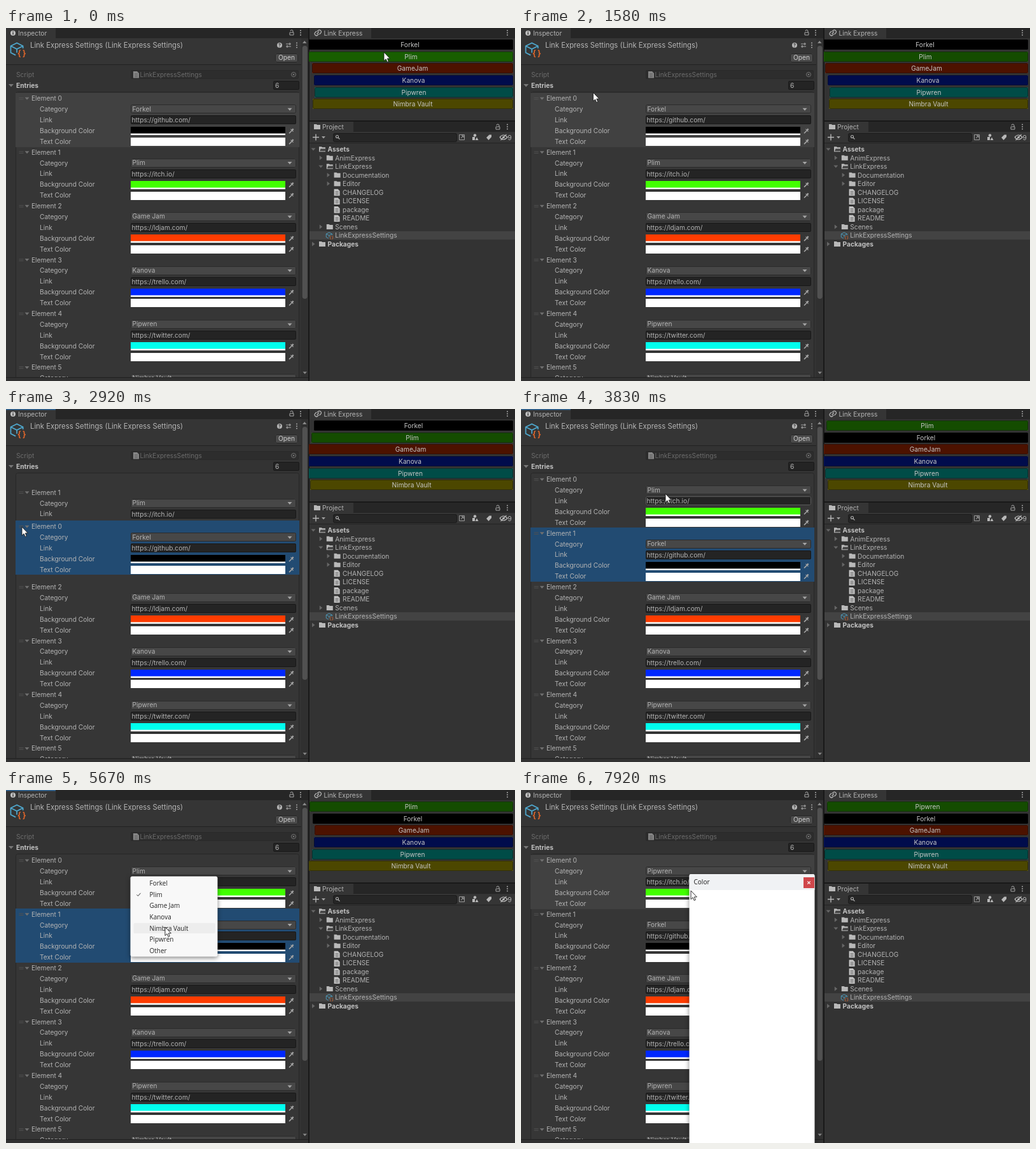
These frames come from a looping animation (800x554 px, 8 s). An HTML page with a canvas:

```html
<!DOCTYPE html>
<html lang="en">
<head>
<meta charset="utf-8">
<title>Link Express</title>
<style>
html, body { margin: 0; width: 100%; height: 100%; overflow: hidden; background: #333; }
canvas { display: block; width: 800px; height: 554px; }
</style>
</head>
<body>
<canvas id="stage" width="800" height="554"></canvas>
<script>
const ctx = document.getElementById('stage').getContext('2d');
const LOOP = 8000, STEP = LOOP / 96;
const ROW = 16.9, PITCH = 84.45, TOP = 110.5;
const UI = 'Inter, sans-serif', MENU = '"Open Sans", sans-serif';
const TEXT = '#b4b4b4', DIM = '#6c6c6c', SELECTED = '#224b72';

// Moments at which the state changes, in ms.
const AT = { grab: 2400, drop: 3415, open: 4245, pick: 6415, picker: 7745 };

const entries = [
  { name: 'Forkel', link: 'https://github.com/', color: '#000000' },
  { name: 'Plim', link: 'https://itch.io/', color: '#42ff00' },
  { name: 'Game Jam', link: 'https://ldjam.com/', color: '#ff3c00' },
  { name: 'Kanova', link: 'https://trello.com/', color: '#0028ff' },
  { name: 'Pipwren', link: 'https://twitter.com/', color: '#00ffee' },
  { name: 'Nimbra Vault', link: '', color: '#ffee00' }
];
const choices = ['Forkel', 'Plim', 'Game Jam', 'Kanova', 'Nimbra Vault', 'Pipwren', 'Other'];

// Pointer path: time, x, y.
const path = [
  [0, 594, 38], [920, 595, 123], [1170, 592, 116], [1670, 72, 100], [2080, 23, 111],
  [2400, 23, 111], [2500, 24, 137], [2920, 25, 185], [3250, 25, 195], [3420, 25, 194],
  [3830, 227, 133], [4010, 231, 128], [4250, 231, 128], [4950, 248, 186], [5600, 250, 215],
  [5900, 250, 215], [6170, 249, 234], [6420, 249, 234], [7170, 267, 160], [7800, 267, 158]
];

function pointerAt(t) {
  const next = path.findIndex(p => p[0] > t);
  if (next < 0) return path[path.length - 1].slice(1);
  const a = path[next - 1], b = path[next];
  const u = (t - a[0]) / (b[0] - a[0]), e = u * u * (3 - 2 * u);
  return [a[1] + (b[1] - a[1]) * e, a[2] + (b[2] - a[2]) * e];
}

// The border lies inside the box so that whole coordinates stay crisp.
function rect(x, y, w, h, fill, r = 0, border) {
  ctx.beginPath();
  ctx.roundRect(x, y, w, h, r);
  if (fill) { ctx.fillStyle = fill; ctx.fill(); }
  if (!border) return;
  ctx.beginPath();
  ctx.roundRect(x + 0.5, y + 0.5, w - 1, h - 1, r);
  ctx.strokeStyle = border;
  ctx.lineWidth = 1;
  ctx.stroke();
}

function label(str, x, midY, { color = TEXT, size = 10.2, weight = 400, align = 'left', font = UI } = {}) {
  ctx.font = `${weight} ${size}px ${font}`;
  ctx.textAlign = align;
  ctx.fillStyle = color;
  ctx.fillText(str, x, Math.round(midY + size * 0.36));
}

function poly(points, fill) {
  ctx.beginPath();
  points.forEach(([x, y]) => ctx.lineTo(x, y));
  ctx.closePath();
  ctx.fillStyle = fill;
  ctx.fill();
}

function line(d, color, width = 1.2) {
  ctx.strokeStyle = color;
  ctx.lineWidth = width;
  ctx.stroke(new Path2D(d));
}

function down(x, y, r = 3.5, color = '#787878') {
  poly([[x - r, y - r / 2], [x + r, y - r / 2], [x, y + r / 2 + 0.5]], color);
}

function right(x, y, color = '#666') {
  poly([[x - 2, y - 3.5], [x + 2.5, y], [x - 2, y + 3.5]], color);
}

function dot(x, y, r, color) {
  ctx.beginPath();
  ctx.arc(x, y, r, 0, 7);
  ctx.fillStyle = color;
  ctx.fill();
}

function dots(x, y) {
  [-3.5, 0, 3.5].forEach(d => dot(x, y + d, 0.9, '#b5b5b5'));
}

function lock(x, y) {
  rect(x - 3.5, y - 0.5, 7, 5, null, 0, '#a8a8a8');
  line(`M${x + 2} ${y}v-2a2 2 0 0 0-4 0`, '#a8a8a8', 1);
}

function folder(x, y, open) {
  poly([[x, y - 4], [x + 4, y - 4], [x + 5, y - 3], [x + 10, y - 3], [x + 10, y + 4], [x, y + 4]], '#b9b9b9');
  if (open) poly([[x + 2.5, y - 0.8], [x + 11.5, y - 0.8], [x + 9.6, y + 3], [x + 1, y + 3]], '#444');
}

function page(x, y, color = '#c4c4c4') {
  poly([[x, y - 5], [x + 6, y - 5], [x + 9, y - 2], [x + 9, y + 5.5], [x, y + 5.5]], color);
  [-1.5, 0.7, 2.9].forEach(d => rect(x + 2, y + d, 5, 0.8, '#555'));
}

function cube(x, y, s) {
  ctx.save();
  ctx.translate(x, y);
  ctx.scale(s, s);
  line('M9 22L1 18V7L11 2L21 7V11M1 7L11 12L21 7M11 12V18', '#4fa9cf', 1.8);
  line('M17 14q-2 0-2 2v2l-1.5 1.5L15 21v2q0 2 2 2M21 14q2 0 2 2v2l1.5 1.5L23 21v2q0 2-2 2', '#d9642b', 1.8);
  ctx.restore();
}

function dropper(x, y) {
  line(`M${x + 4} ${y + 4}l4.5-4.5`, '#a5a5a5', 1.6);
  line(`M${x + 6.5} ${y - 2.5}l4 4`, '#a5a5a5', 1.1);
  line(`M${x + 8.5} ${y - 0.5}l2-2.5`, '#a5a5a5', 2.4);
}

function colorField(y, color, bar) {
  const top = Math.round(y - 6);
  rect(196, top, 243, 13, '#fff');
  if (bar) rect(196, top, 243, 10.5, color);
  dropper(441, y);
}

function element(index, entry, y, fill, hoverLink) {
  if (fill) rect(15, Math.round(y - 9), 446, 85, fill);
  [-1.5, 1].forEach(d => rect(20.5, y + d, 7, 1, '#505050'));
  down(33, y, 3.5, '#707070');
  label('Element ' + index, 40, y);
  ['Category', 'Link', 'Background Color', 'Text Color']
    .forEach((s, i) => label(s, 53, y + ROW * (i + 1)));
  rect(196, Math.round(y + ROW - 7), 260, 14, '#474747', 2, '#2b2b2b');
  label(entry.name, 198.5, y + ROW - 0.5);
  down(446, y + ROW, 3.5, '#a5a5a5');
  rect(196, Math.round(y + ROW * 2 - 7), 260, 14, '#242424', 2, hoverLink ? '#5c5c5c' : '#181818');
  label(entry.link, 197.5, y + ROW * 2 + 0.3);
  colorField(y + ROW * 3, entry.color, true);
  colorField(y + ROW * 4, '#fff', false);
}

function tab(x, y, w, text, textX) {
  rect(x, y, w, 17, '#353535');
  label(text, textX, y + 8.5);
}

function inspectorChrome(focused) {
  rect(0, 0, 475, 16, '#262626');
  tab(0, -0.5, 78, 'Inspector', 19);
  if (focused) rect(0, 0, 78, 1.5, '#2f6799');
  dot(11, 8, 4, '#c0c0c0');
  rect(10.4, 7, 1.3, 3.6, '#333');
  rect(10.4, 5, 1.3, 1.2, '#333');
  lock(449, 7);
  dots(463, 7.5);

  rect(0, 16, 464, 41, '#353535');
  rect(0, 57, 464, 1, '#222');
  cube(6.5, 21.5, 0.96);
  label('Link Express Settings (Link Express Settings)', 38, 27, { size: 11.3 });
  dot(430, 27, 4, '#b5b5b5');
  label('?', 430, 27, { color: '#333', size: 7, weight: 700, align: 'center' });
  line('M440 25h8M440 29h8M446 23v4M442 27v4', '#a8a8a8', 1.1);
  dots(457, 27);
  rect(423, 40, 36, 14, '#4a4a4a', 2.5, '#272727');
  label('Open', 441, 46.7, { color: '#d0d0d0', align: 'center' });

  label('Script', 16, 73, { color: DIM });
  rect(196, 66, 264, 14, '#2d2d2d', 2, '#292929');
  page(200, 73, '#868686');
  label('LinkExpressSettings', 210.5, 73.3, { color: DIM });
  line('M448.5 73a3.5 3.5 0 1 0 7 0a3.5 3.5 0 1 0-7 0', '#727272', 1);
  dot(452, 73, 1.3, '#727272');
  down(8, 90, 4, '#777');
  label('Entries', 16, 90, { weight: 700, color: '#c2c2c2' });
  rect(420, 83, 41, 14, '#242424', 2, '#181818');
  label('6', 423, 90.5);
}

function scrollbar() {
  rect(464, 16, 11, 532, '#303030');
  poly([[466, 24], [472.5, 24], [469.2, 20]], '#8a8a8a');
  poly([[466.5, 539.5], [473, 539.5], [469.7, 543]], '#8a8a8a');
  rect(465.7, 28, 8, 397, '#515151', 4);
  rect(0, 548, 475, 1, '#202020');
  rect(0, 549, 475, 5, '#323232');
}

function list(t, px, py) {
  const dropped = t >= AT.drop, dragging = t >= AT.grab && !dropped;
  const items = entries.slice();
  if (dropped) [items[0], items[1]] = [items[1], items[0]];
  if (t >= AT.pick) items[0] = { ...items[0], name: 'Pipwren' };
  const active = dropped && t < AT.pick ? 1 : 0;
  const fill = t >= AT.grab && t < AT.picker ? SELECTED : '#414141';

  ctx.save();
  ctx.beginPath();
  ctx.rect(0, 98, 464, 450);
  ctx.clip();
  rect(15, 100, 446, 460, '#363636', 3, '#272727');
  const offset = dragging ? Math.max(0, py - 111) : 0;
  const pushed = Math.min(PITCH, Math.max(0, offset - 10));
  items.forEach((item, i) => {
    if (dragging && i === 0) return;
    const y = TOP + PITCH * i - (dragging && i === 1 ? pushed : 0);
    const hover = px > 196 && px < 456 && Math.abs(py - y - ROW * 2) < 12 && t > AT.drop && t < AT.open;
    element(i, item, y, i === active ? fill : null, hover && i === 0);
  });
  if (dragging) element(0, items[0], TOP + offset, fill);
  ctx.restore();
  return items;
}

function linkPanel(t, items, px, py) {
  rect(477, 0, 323, 16, '#262626');
  tab(477, -0.5, 97, 'Link Express', 499.5);
  line('M489 5.5l1.5-1.5q2-2 4 0t0 4l-2 2M491.5 9l-1.5 2q-2 2-4 0t0-4l2-2M488.5 9.5l3.5-4', '#b5b5b5', 1.2);
  dots(788, 7.5);

  // The editor stops repainting while its menu is open.
  const clock = t > AT.open && t < AT.pick ? AT.open - 15 : t;
  ctx.save();
  ctx.beginPath();
  ctx.rect(476.5, 16, 323.5, 129);
  ctx.clip();
  items.forEach((item, i) => {
    const left = Math.round(479 + 6 * Math.sin(7.67 * clock / 1000 - 1.3 + 0.78 * i));
    const w = 797 - left, top = Math.round(18.2 + 18.6 * i);
    const hover = px > left && py >= top && py < top + 17;
    rect(left, top, w, 16, item.color, 2.5);
    rect(left, top, w, 16, `rgba(0,0,0,${hover ? 0.63 : 0.7})`, 2.5);
    rect(left, top, w, 16, null, 2.5, 'rgba(15,15,15,.4)');
    label(item.name.replace('Game Jam', 'GameJam'), left + w / 2, top + 8.2, { color: '#c6c6c6', align: 'center' });
  });
  ctx.restore();
}

function projectPanel() {
  rect(477, 145, 323, 18, '#262626');
  rect(477, 145, 323, 2, '#191919');
  tab(477, 147, 69, 'Project', 497);
  folder(484, 155, false);
  lock(773, 155);
  dots(788, 155);
  rect(477, 163, 323, 17, '#353535');
  rect(477, 180, 323, 1, '#232323');
  line('M482 171.5h10M487 166.5v10', '#b8b8b8', 1.4);
  down(499, 171.5, 3, '#a0a0a0');
  rect(514, 165, 195, 14, '#262626', 3, '#1b1b1b');
  line('M518.5 170.5a2 2 0 1 0 4 0a2 2 0 1 0-4 0M522 172l2.5 2.5', '#b0b0b0', 1.1);
  rect(712, 167, 9, 9, null, 0, '#999');
  line('M715 173l4-4M716 169h3v3', '#aaa', 1);
  dot(737, 168.5, 2.3, '#b8b8b8');
  rect(733, 171, 4, 5, '#b8b8b8');
  poly([[737.5, 176], [740, 171.5], [742.5, 176]], '#b8b8b8');
  poly([[755, 172], [759.5, 167.5], [763, 167.5], [763, 171], [758.5, 176]], '#b8b8b8');
  line('M776 171.5q6-7 12 0q-6 7-12 0M777.5 176l9-9', '#b8b8b8', 1.2);
  dot(782, 171.5, 1.8, '#b8b8b8');
  label('9', 788.5, 172);

  // name, depth, kind
  const tree = [
    ['Assets', 0, 'open'], ['AnimExpress', 1, 'closed'], ['LinkExpress', 1, 'open'],
    ['Documentation', 2, 'closed'], ['Editor', 2, 'closed'], ['CHANGELOG', 2, 'file'],
    ['LICENSE', 2, 'file'], ['package', 2, 'file'], ['README', 2, 'file'],
    ['Scenes', 1, 'closed'], ['LinkExpressSettings', 1, 'asset'], ['Packages', 0, 'closed']
  ];
  tree.forEach(([name, depth, kind], i) => {
    const x = 483 + depth * 11.8, y = 190.2 + 13.53 * i;
    if (kind === 'asset') {
      rect(477, Math.round(y - 6.8), 323, 13, '#434343');
      cube(x + 8, y - 5.5, 0.46);
    } else if (kind === 'file') {
      page(x + 9, y);
    } else {
      kind === 'open' ? down(x, y, 3.5, '#666') : right(x, y);
      folder(x + 9, y, kind === 'open');
    }
    label(name, x + 22.5, y + 0.2, { weight: depth ? 400 : 700, color: depth ? TEXT : '#c2c2c2' });
  });
}

function shadowed(draw) {
  ctx.save();
  ctx.shadowColor = 'rgba(0,0,0,.5)';
  ctx.shadowBlur = 7;
  ctx.shadowOffsetY = 2;
  draw();
  ctx.restore();
}

function menu(py) {
  shadowed(() => rect(195.5, 135.5, 137, 126, '#f8f8f8', 3));
  choices.forEach((name, i) => {
    const y = 146.5 + 17.6 * i;
    if (Math.abs(py - y) < 8.8) rect(200.5, y - 8.2, 128.5, 16.4, '#ededed', 2);
    label(name, 225.5, y, { color: '#242424', size: 10, font: MENU });
  });
  line('M205.5 164.3l2 2l4-4.5', '#333', 1);
}

function colorWindow() {
  shadowed(() => rect(264.5, 132, 197, 430, '#fff', 3));
  rect(264.5, 132, 197, 25, '#f0f2f4', [3, 3, 0, 0]);
  label('Color', 271.5, 144.5, { color: '#1c1c1c', size: 10, font: MENU });
  rect(444, 137, 17, 17, '#d0474b');
  line('M450.3 143.3l4.4 4.4M454.7 143.3l-4.4 4.4', '#fff', 1.2);
}

function pointer(x, y) {
  ctx.save();
  ctx.translate(x, y);
  const arrow = new Path2D('M0 0V13.5L3.1 10.7L5.2 15.4L7.3 14.4L5.3 9.9H9.4Z');
  ctx.fillStyle = '#fff';
  ctx.fill(arrow);
  ctx.strokeStyle = '#1a1a1a';
  ctx.lineWidth = 0.9;
  ctx.stroke(arrow);
  ctx.restore();
}

function draw(now) {
  const t = Math.floor((now % LOOP + 5) / STEP) % 96 * STEP;
  const [px, py] = pointerAt(t);
  rect(0, 0, 800, 554, '#333');
  inspectorChrome(t >= AT.grab && t < AT.picker);
  const items = list(t, px, py);
  scrollbar();
  rect(475, 0, 2, 554, '#191919');
  linkPanel(t, items, px, py);
  projectPanel();
  if (t >= AT.open && t < AT.pick) menu(py);
  if (t >= AT.picker) colorWindow();
  pointer(px, py);
}

const start = performance.now();
(function frame() {
  draw(performance.now() - start);
  requestAnimationFrame(frame);
})();
</script>
</body>
</html>
```
